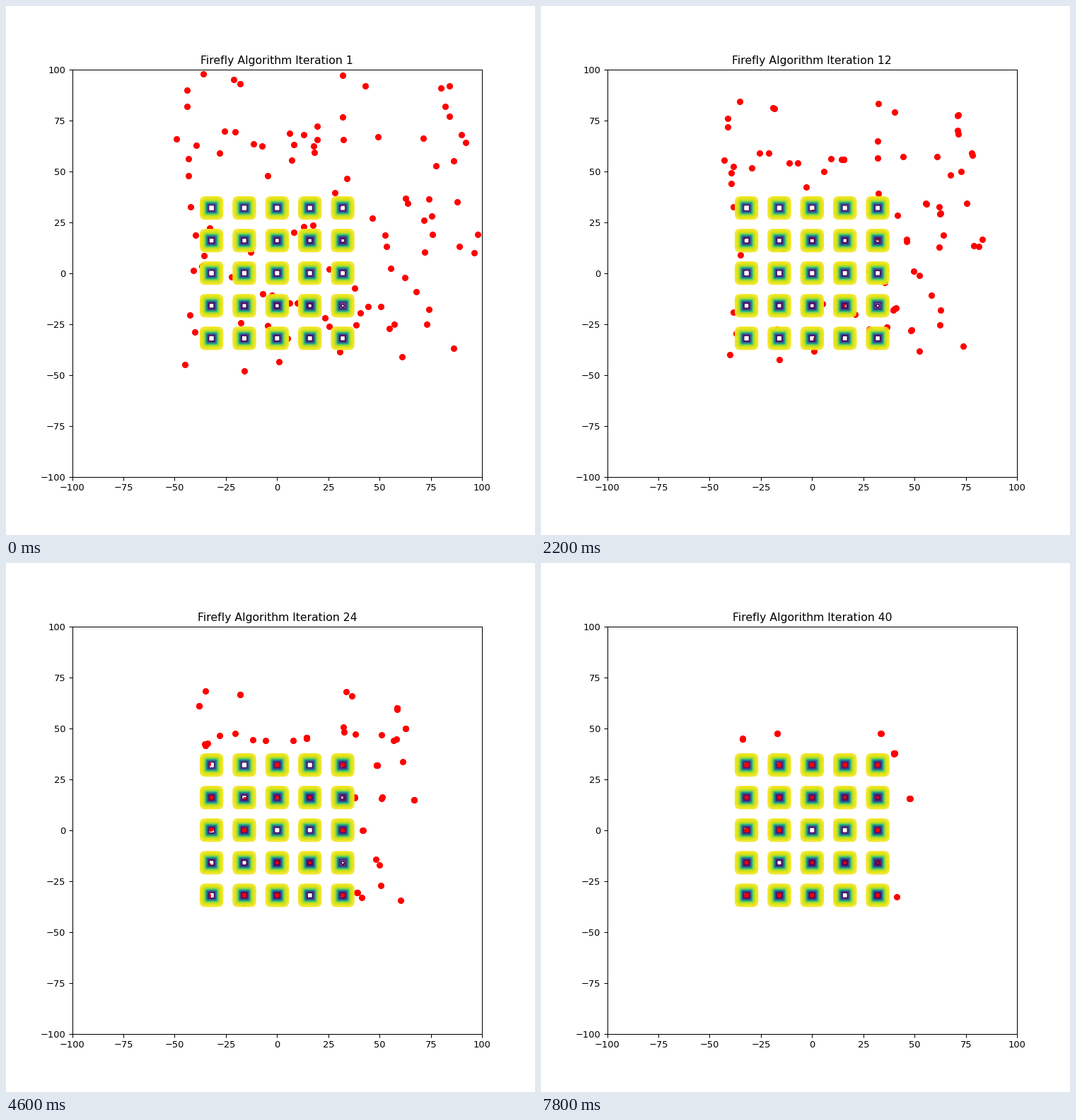
These frames come from a looping animation (748x748 px, 8000 ms). A matplotlib script:

```python
import numpy as np
import matplotlib.pyplot as plt
from matplotlib.animation import FuncAnimation

FRAMES, INTERVAL = 40, 200
HOLES = np.arange(-32, 33, 16)
SWARM = 100
REACH = 6      # distance over which fireflies attract each other
PULL = 0.08    # share of that distance closed per step

# Fireflies on the outer rim; the others are scattered at random.
RIM = [(-36, 98), (-44, 90), (-44, 82), (-21, 95), (-18, 93), (32, 97),
       (43, 92), (80, 91), (84, 92), (82, 82), (84, 77), (90, 68), (92, 64),
       (86, 55), (88, 35), (98, 19), (89, 13), (96, 10), (86, -37),
       (73, -25), (68, -9), (61, -41), (-16, -48), (-45, -45), (-49, 66)]


def foxholes(x, y):
    total = 0.002
    for row, hy in enumerate(HOLES):
        for col, hx in enumerate(HOLES):
            depth = 5 * row + col + 1
            total = total + 1 / (depth + (x - hx) ** 6 + (y - hy) ** 6)
    return 1 / total


def to_hole(points):
    """Vectors to the nearest hole and their longer side."""
    way = 16 * np.clip(np.round(points / 16), -2, 2) - points
    return way, np.abs(way).max(axis=1, keepdims=True)


def attraction(points):
    gap = points[None, :] - points[:, None]
    weight = np.exp(-(gap ** 2).sum(axis=2) / REACH ** 2)
    return PULL * (weight[..., None] * gap).sum(axis=1)


def simulate():
    rng = np.random.default_rng(7)
    others = rng.uniform(-44, 78, (SWARM - len(RIM), 2))
    points = np.vstack([RIM, others])
    _, dist = to_hole(points)
    speed = dist / (24 + 0.45 * dist)
    track = [points]
    for _ in range(FRAMES - 1):
        way, dist = to_hole(points)
        drift = way * np.minimum(1, speed / np.maximum(dist, 1e-9))
        points = points + drift + attraction(points)
        track.append(points)
    return track


track = simulate()
fig, ax = plt.subplots(figsize=(8, 8), dpi=93.5)
axis = np.linspace(-100, 100, 801)
X, Y = np.meshgrid(axis, axis)
ax.contour(X, Y, foxholes(X, Y), levels=50, cmap="viridis", zorder=2)
dots = ax.scatter(*track[0].T, color="red", zorder=1)
ax.set_xlim(-100, 100)
ax.set_ylim(-100, 100)
title = ax.set_title("Firefly Algorithm Iteration 1")


def update(step):
    dots.set_offsets(track[step])
    title.set_text(f"Firefly Algorithm Iteration {step + 1}")
    return dots, title


anim = FuncAnimation(fig, update, frames=FRAMES, interval=INTERVAL,
                     repeat=True, repeat_delay=0)
plt.show()
```
